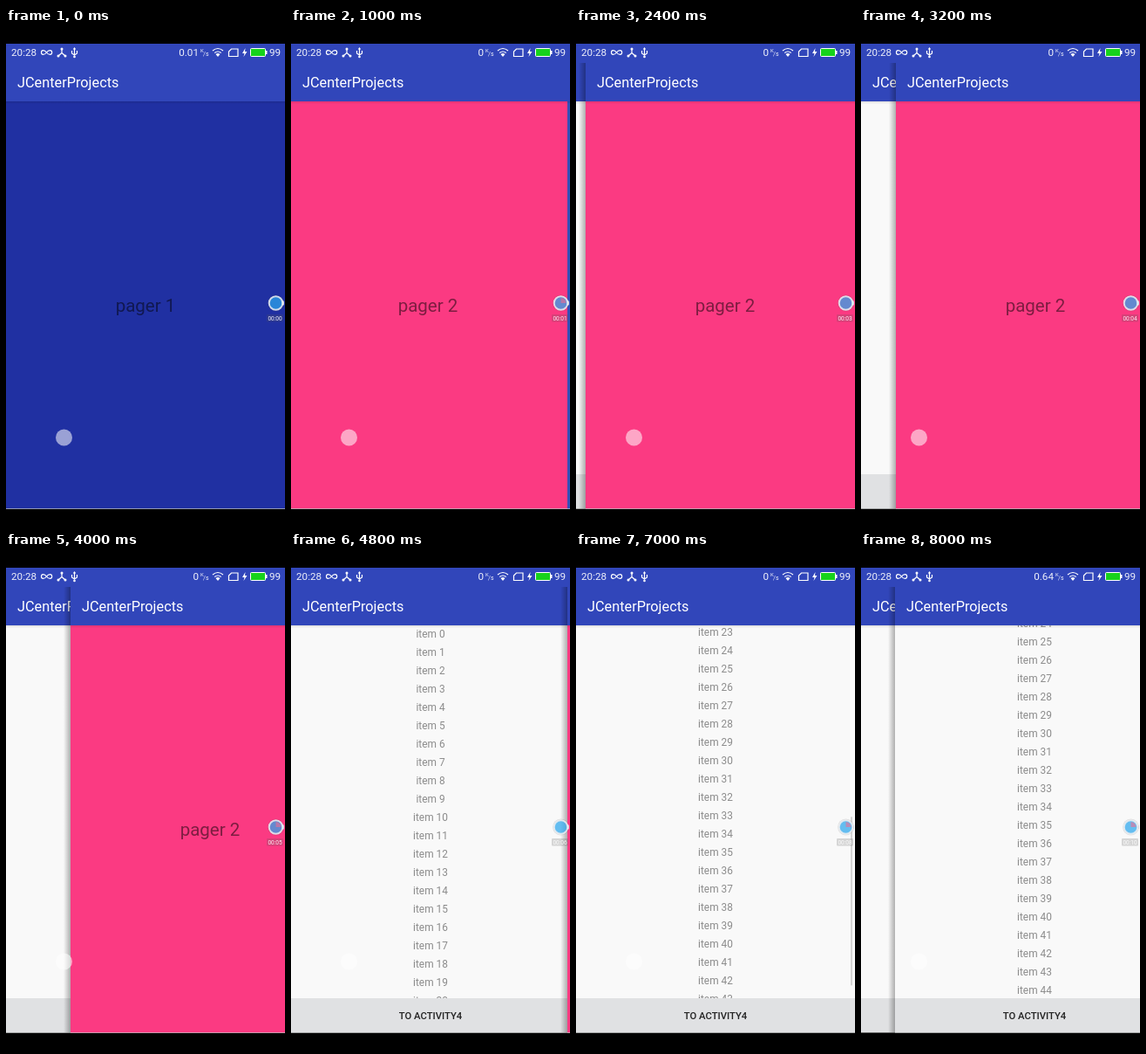
Recreate the animation shown at these times as an HTML page. Size 320 px wide and 568 px high, loop 8200 ms.

```html
<!DOCTYPE html>
<html lang="en">
<head>
<meta charset="utf-8">
<title>Swipe back demo</title>
<style>
  html, body { margin: 0; width: 100%; height: 100%; overflow: hidden; background: #000; }
  svg { display: block; font-family: Roboto, "Noto Sans", sans-serif; }
  .title { font-size: 16.3px; fill: #fff; }
  .page { font-size: 20.5px; text-anchor: middle; fill: #000; fill-opacity: .5; }
  .item { font-size: 11.9px; text-anchor: middle; fill: #8c8c8c; }
  .button { font-size: 11.3px; font-weight: 500; text-anchor: middle; fill: #222; }
  .status { font-size: 11.7px; fill: #fff; fill-opacity: .92; }
  .line { fill: none; stroke: #fff; stroke-width: 1.2; }
</style>
</head>
<body>
<svg id="stage" width="320" height="568" viewBox="0 0 320 568"></svg>
<script>
const LOOP = 8200, STEP = 200, ROW = 21, ROWS = 45, VIEW = 427;
const TOP = 18, BOTTOM = 550.5, EDGE = 8;
const BAR = '#3146ba';

// Each track is a list of [time, value] keys
const tracks = {
  page: [[0, 0], [200, .1], [400, .5], [600, .93], [800, 1], [1000, 1.0094], [1200, 1.4],
         [1400, 1.95], [1600, 2], [1800, 1.5], [2000, 1.05], [2200, 1]],
  pagerX: [[2200, 0], [2400, 11], [3200, 40], [4000, 74], [4400, 210], [4800, 317], [5000, 320]],
  listX: [[7600, 0], [8000, 39]],
  scroll: [[4800, 0], [5200, 70], [5600, 175], [6000, 248], [6400, 340], [6800, 455], [7200, 516]]
};

function valueAt(keys, t) {
  const next = keys.findIndex(k => k[0] > t);
  if (next === 0) return keys[0][1];
  if (next < 0) return keys[keys.length - 1][1];
  const [t0, a] = keys[next - 1], [t1, b] = keys[next];
  return a + (b - a) * (t - t0) / (t1 - t0);
}

const rect = (x, y, w, h, fill, more = '') =>
  `<rect x="${x}" y="${y}" width="${w}" height="${h}" fill="${fill}" ${more}/>`;
const text = (cls, x, y, s, more = '') => `<text class="${cls}" x="${x}" y="${y}" ${more}>${s}</text>`;

const activity = (id, body) => `
  ${rect(-EDGE, 40, EDGE, BOTTOM - 40, 'url(#edge)', `id="${id}Edge"`)}
  <svg id="${id}" width="320" height="${BOTTOM}">
    ${rect(0, 40, 320, BOTTOM - 40, '#f9f9f9')}
    ${body}
    ${rect(0, 84, 320, 3, 'url(#drop)')}
    ${rect(0, 40, 320, 44, BAR)}
    ${text('title', 13, 67.5, 'JCenterProjects')}
  </svg>`;

const bottomBar = rect(0, 511, 320, BOTTOM - 511, '#e0e1e3') + text('button', 160, 535, 'TO ACTIVITY4');

const rows = Array.from({ length: ROWS }, (_, i) =>
  text('item', 160, 14 + i * ROW, 'item ' + i)).join('');

const list = `<svg y="84" width="320" height="${VIEW}">
    <g id="rows">${rows}</g>
    ${rect(315, 0, 2, VIEW * VIEW / (ROW * ROWS), '#d4d4d4', 'id="thumb"')}
  </svg>` + bottomBar;

const pages = ['#2030a2', '#fb3a82', '#3350b8'].map((color, i) =>
  rect(i * 320, 84, 320, BOTTOM - 84, color) +
  text('page', i * 320 + 160, 325, 'pager ' + (i + 1))).join('');

const statusBar = `
  ${rect(0, TOP, 320, 40 - TOP, BAR)}
  ${text('status', 6, 32, '20:28')}
  <g class="line">
    <path d="M46.5 28C44 24.5 40.5 25 40.5 28S44 31.5 46.5 28S52.7 25 52.7 28S49 31.5 46.5 28"/>
    <path d="M64 24V28.5L60 32M64 28.5L68 32"/>
    <path d="M78.5 23V33M75.5 26V29L78.5 31L81.5 29V26"/>
    <path d="M237 26Q243 21 249 26M239.3 28.5Q243 25.5 246.7 28.5"/>
    <path d="M258.5 24H266V32.5H255.5V27Z"/>
  </g>
  <g fill="#fff">
    <circle cx="64" cy="24" r="1.5"/><circle cx="60" cy="32" r="1.5"/><circle cx="68" cy="32" r="1.5"/>
    <circle cx="78.5" cy="33" r="1.3"/><path d="M76.8 24.5L78.5 22L80.2 24.5Z"/>
    <path d="M240.5 30Q243 28 245.5 30L243 33Z"/>
    <path d="M274.5 23L271 29H273.5L272.5 33L276.5 27H274Z"/>
    <rect x="298" y="26" width="1.5" height="4"/>
  </g>
  ${rect(280.5, 23.5, 17, 9, '#17d21c', 'rx="1" stroke="#fff"')}
  ${text('status', 221, 32, '', 'id="speed" text-anchor="end"')}
  ${text('status', 223, 28, 'K', 'style="font-size:6px"')}
  ${text('status', 226, 32, '/s', 'style="font-size:7px"')}
  ${text('status', 302, 32, '99')}`;

const overlay = `
  <circle cx="66.5" cy="469" r="9.5" fill="#fff" fill-opacity=".55"/>
  ${rect(316, 312.5, 3, 5, '#e6e8ee', 'rx="1"')}
  <circle cx="309.5" cy="315" r="9.4" fill-opacity=".1"/>
  <circle cx="309.5" cy="315" r="7.8" fill="#2faef7" fill-opacity=".7" stroke="#eceef2" stroke-opacity=".85" stroke-width="2"/>
  <path id="wedge" d="M309.5 315V309A6 6 0 0 1 315.5 315Z" fill="#f06a90" fill-opacity=".6"/>
  ${rect(299, 328, 19, 8.5, '#555', 'rx="1" fill-opacity=".22"')}
  ${text('status', 308.5, 334.7, '', 'id="timer" text-anchor="middle" style="font-size:6.5px"')}`;

document.getElementById('stage').innerHTML = `
  <defs>
    <linearGradient id="edge"><stop stop-opacity="0"/><stop offset="1" stop-opacity=".3"/></linearGradient>
    <linearGradient id="drop" x2="0" y2="1"><stop stop-opacity=".12"/><stop offset="1" stop-opacity="0"/></linearGradient>
  </defs>
  ${activity('home', bottomBar)}
  ${activity('list', list)}
  ${activity('pager', `<g id="pages">${pages}</g>`)}
  ${statusBar}${overlay}`;

const $ = id => document.getElementById(id);
const show = (id, on) => $(id).setAttribute('visibility', on ? 'visible' : 'hidden');

function slide(id, x) {
  $(id).setAttribute('x', x);
  $(id + 'Edge').setAttribute('x', x - EDGE);
  show(id + 'Edge', x < 320);
}

function draw(t) {
  const scroll = valueAt(tracks.scroll, t);
  slide('pager', valueAt(tracks.pagerX, t));
  slide('list', valueAt(tracks.listX, t));
  $('pages').setAttribute('transform', `translate(${-320 * valueAt(tracks.page, t)})`);
  $('rows').setAttribute('transform', `translate(0 ${-scroll})`);
  $('thumb').setAttribute('y', scroll * VIEW / (ROW * ROWS));
  show('thumb', t > 4900 && t < 7500);
  const tick = t / STEP;
  show('wedge', tick % 5 === 0 && tick % 15);
  $('speed').textContent = t < 800 ? '0.01' : t < 7400 ? '0' : '0.64';
  $('timer').textContent = '00:' + String(Math.floor(t / 800)).padStart(2, '0');
}

const start = performance.now();
function frame() {
  const t = (performance.now() - start) % LOOP;
  draw(Math.floor(t / STEP) * STEP);
  requestAnimationFrame(frame);
}
frame();
</script>
</body>
</html>
```
